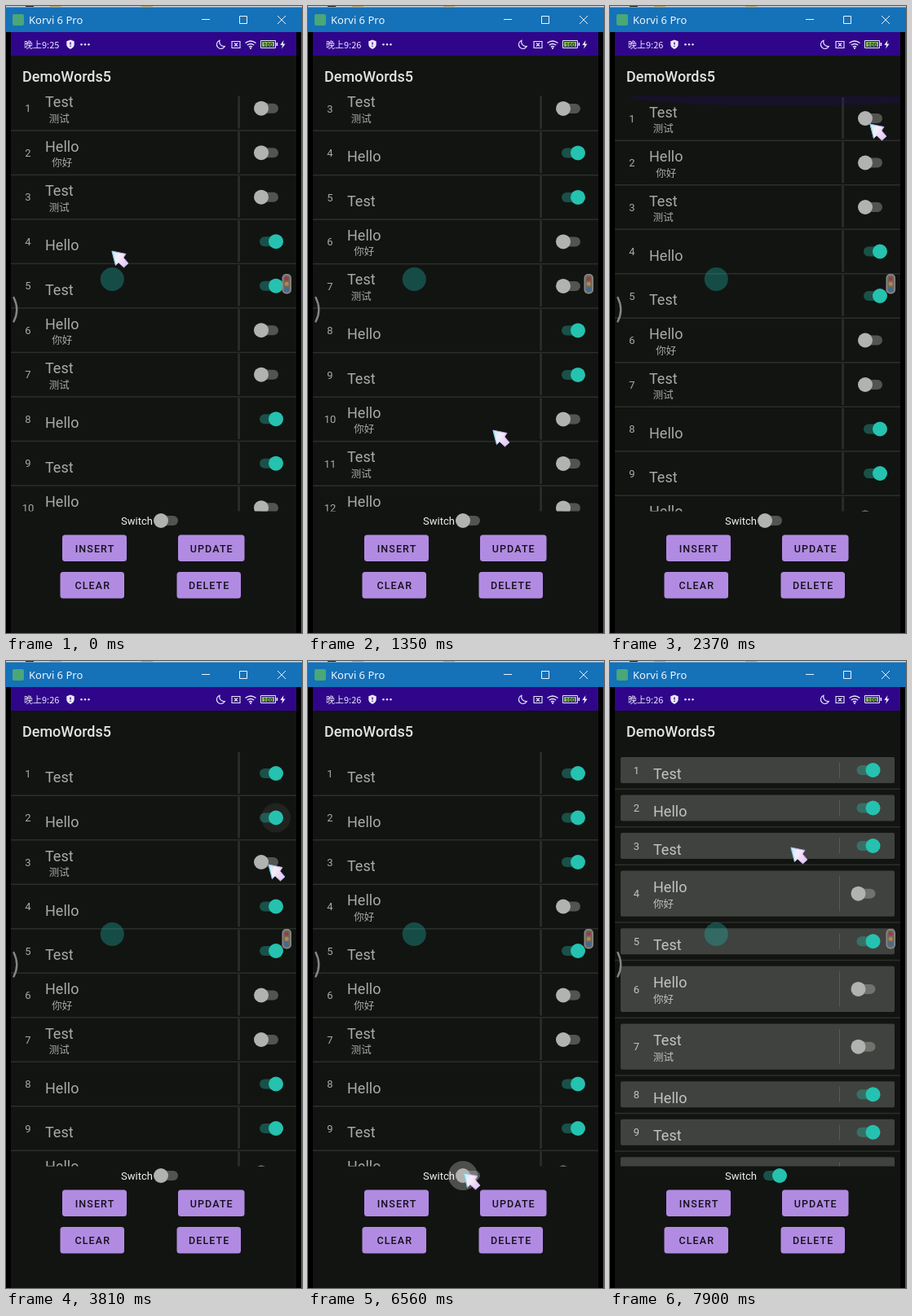
An HTML page with a canvas that plays this animation: 363 by 770 pixels, repeating every 7.99 s.

```html
<!DOCTYPE html>
<html lang="en">
<head>
<meta charset="utf-8">
<title>List demo</title>
<style>
html, body { margin: 0; width: 100%; height: 100%; overflow: hidden; background: #000; }
canvas { display: block; }
</style>
</head>
<body>
<canvas id="stage" width="363" height="770"></canvas>
<script>
const ctx = document.getElementById('stage').getContext('2d');
const LOOP = 7990;
const CARDS_AT = 6650;
const TOP = 111.5, BOTTOM = 620.5, ROW = 54.5;
const BG = '#121411', TEAL = '#25c2b0', GREY = '#b1b3b0';
const ROBOTO = 'Roboto, sans-serif';
const CJK = '"Noto Sans CJK SC", "Noto Sans CJK", sans-serif';

// [time, value, ...]
const SCROLL = [[0, 11.5], [120, 110], [280, 250], [430, 307], [900, 307],
  [1100, 245], [1350, 121.5], [1560, 30], [1680, 0]];
const POINTER = [[0, 130, 301], [510, 191, 400], [850, 205, 408], [1350, 227, 521],
  [1680, 237, 560], [1800, 242, 556], [2280, 319, 145], [2750, 319, 145],
  [3150, 321, 197], [3520, 322, 197], [3790, 322, 250], [4250, 322, 250],
  [4600, 322, 302], [5150, 322, 304], [6100, 197, 625], [6300, 191, 629],
  [7230, 191, 629], [7860, 222, 229]];
const CLICKS = { 1: 2750, 2: 3480, 3: 4120, 4: 5000 };
const SWITCH_CLICK = 6400;
const INITIALLY_ON = [4, 5, 8, 9, 14];

const clamp = v => Math.max(0, Math.min(1, v));
const smooth = v => { v = clamp(v); return v * v * (3 - 2 * v); };

function sample(keys, t, ease = v => v) {
  const next = keys.findIndex(k => k[0] > t);
  if (next < 0) return keys[keys.length - 1].slice(1);
  const a = keys[next - 1], b = keys[next];
  const f = ease((t - a[0]) / (b[0] - a[0]));
  return a.slice(1).map((v, i) => v + (b[i + 1] - v) * f);
}

function rect(x, y, w, h, color) {
  ctx.fillStyle = color;
  ctx.fillRect(x, y, w, h);
}

function round(x, y, w, h, r, color) {
  ctx.fillStyle = color;
  ctx.beginPath();
  ctx.roundRect(x, y, w, h, r);
  ctx.fill();
}

function disc(x, y, r, color) {
  ctx.fillStyle = color;
  ctx.beginPath();
  ctx.arc(x, y, r, 0, 7);
  ctx.fill();
}

function stroke(path, color, width) {
  ctx.strokeStyle = color;
  ctx.lineWidth = width;
  ctx.stroke(new Path2D(path));
}

function fill(path, color) {
  ctx.fillStyle = color;
  ctx.fill(new Path2D(path));
}

function text(str, x, y, font, color, align = 'left') {
  ctx.font = font;
  ctx.fillStyle = color;
  ctx.textAlign = align;
  ctx.fillText(str, x, y);
}

function toggle(x, y, pos) {
  ctx.globalAlpha = 0.35;
  round(x - 11, y - 6, 23, 12, 6, pos > 0.5 ? TEAL : '#c8cac7');
  ctx.globalAlpha = 1;
  disc(x - 9 + 18 * pos, y, 9, pos > 0.5 ? TEAL : GREY);
}

function ripple(x, y, age, strength) {
  if (age < 0 || age > 480) return;
  const alpha = strength * (1 - clamp((age - 200) / 280));
  disc(x, y, 18 * smooth(age / 150 + 0.2), `rgba(255,255,255,${alpha})`);
}

function rowState(n, t) {
  const start = INITIALLY_ON.includes(n);
  const age = n in CLICKS ? t - CLICKS[n] : -1;
  const on = age >= 0 ? !start : start;
  const moved = age >= 0 ? smooth(age / 180) : 1;
  return {
    on, age,
    pos: on ? moved : 1 - moved,
    title: n % 2 ? 'Test' : 'Hello',
    sub: n % 2 ? '测试' : '你好'
  };
}

function plainRow(n, y, row) {
  const color = '#a9aba8';
  rect(6, y + 26.5, 350, 1.5, '#2c2e2b');
  rect(284.3, y - 26, 2.6, 51, '#2c2e2b');
  text(n, 27, y + 4.7, '13px ' + ROBOTO, color, 'center');
  text(row.title, 48, y + (row.on ? 11 : -1.5), '18px ' + ROBOTO, color);
  if (!row.on) {
    const middle = 48 + ctx.measureText(row.title).width / 2;
    text(row.sub, middle, y + 17, '12.5px ' + CJK, color, 'center');
  }
  ripple(row.on ? 331 : 313, y, row.age, 0.12);
  toggle(322, y, row.pos);
}

function cardRow(n, top, height, row) {
  const y = top + 6.5, h = height - 14.5, mid = y + h / 2;
  const color = '#c2c4c1';
  rect(6, top + height - 1.5, 350, 1.5, '#2c2e2b');
  round(13, y, 336, h, 2, '#40423f');
  rect(281, y + 6.5, 1, h - 13, '#585a57');
  text(n, 32.5, mid + 4.7, '13px ' + ROBOTO, color, 'center');
  text(row.title, 53, mid + (row.on ? 10.5 : -2), '18px ' + ROBOTO, color);
  if (!row.on) text(row.sub, 53, mid + 17, '12.5px ' + CJK, color);
  toggle(313.5, mid, row.pos);
}

function list(t) {
  ctx.save();
  ctx.beginPath();
  ctx.rect(6, 110.5, 350, BOTTOM - 110.5);
  ctx.clip();
  const [scroll] = sample(SCROLL, t);
  let top = TOP - scroll;
  for (let n = 1; n <= 15; n++) {
    const row = rowState(n, t);
    if (t < CARDS_AT) {
      plainRow(n, top + 26.5, row);
      top += ROW;
    } else {
      const height = row.on ? 46.5 : 70.75;
      cardRow(n, top, height, row);
      top += height;
    }
  }
  const glow = smooth((t - 1680) / 150) * (1 - smooth((t - 2300) / 250));
  if (glow > 0) {
    ctx.fillStyle = `rgba(45,8,140,${0.25 * glow})`;
    ctx.beginPath();
    ctx.ellipse(215, TOP, 190, 11, 0, 0, 7);
    ctx.fill();
  }
  ctx.restore();
}

function windowBar() {
  rect(0, 0, 363, 2, '#cfd6dc');
  rect(24, 0, 10, 1, '#222');
  [54, 166].forEach(x => rect(x, 0, 14, 1, '#c9a76a'));
  rect(0, 1.5, 363, 30.5, '#1571b8');
  round(8, 10, 14, 14, 2, '#49a778');
  text('Korvi 6 Pro', 28, 22, '13px "Noto Sans", sans-serif', '#f2f7fb');
  stroke('M240 16.5h10M286.5 12.5h9v9h-9zM333 12l10 10M343 12l-10 10', '#eef4f9', 1);
}

function statusBar(t) {
  rect(6, 32, 350, 29, '#2f068a');
  const white = '#ece8f6';
  text(t < 930 ? '晚上9:25' : '晚上9:26', 22, 51.5, '500 11px ' + CJK, white);
  fill('M79 41.5l4.7 1.7v4q0 3.7-4.7 5.7q-4.7-2-4.7-5.7v-4z', white);
  stroke('M79 44.5v3M79 48.7v1.3', '#2f068a', 1.3);
  [92.5, 97, 101.5].forEach(x => disc(x, 47.3, 1.2, white));
  stroke('M262 42.3a5.2 5.2 0 1 0 6.3 7.2a5.5 5.5 0 0 1-6.3-7.2z', white, 1.1);
  stroke('M277 43.5h10v8h-10zM280 45.5l4 4M284 45.5l-4 4', white, 1.1);
  stroke('M293.5 45.5q6.5-5 13 0M295.8 48q4.2-3.2 8.4 0M298 50.3q2-1.4 4 0', white, 1.5);
  disc(300, 52, 1.1, white);
  ctx.lineCap = 'butt';
  stroke('M312.5 42.5h18v9h-18z', white, 1);
  rect(314, 44, 15, 6, '#83bf55');
  rect(331.5, 45, 1.7, 4, white);
  text('100', 321.5, 50, 'bold 7px ' + ROBOTO, '#24352a', 'center');
  fill('M340.5 42l-4.2 6h2.7l-.8 4.5l4.3-6h-2.7z', white);
}

function button(label, x, y, w) {
  round(x, y, w, 32.5, 3.5, '#b18be2');
  ctx.letterSpacing = '1.1px';
  text(label, x + w / 2 + 0.5, y + 21, '500 12.5px ' + ROBOTO, '#15111c', 'center');
  ctx.letterSpacing = '0px';
}

function controls(t) {
  text('Switch', 141, 637, '13px ' + ROBOTO, '#f1f1f1');
  const on = t >= CARDS_AT;
  if (!on) ripple(190, 632, t - SWITCH_CLICK, 0.25);
  toggle(199, 632, on ? 1 : 0);
  button('INSERT', 69, 649.5, 79);
  button('UPDATE', 211, 649.5, 81.5);
  button('CLEAR', 66.5, 695, 78.5);
  button('DELETE', 209.5, 695, 78.5);
}

function overlays() {
  disc(130.3, 335.5, 14.5, 'rgba(30,178,166,.36)');
  ctx.lineCap = 'round';
  stroke('M9.5 358q7.5 15 0 29.5', '#858784', 2.4);
  ctx.lineCap = 'butt';
  round(338.5, 329, 11.5, 24.5, 5, '#8b8a86');
  round(340, 330.5, 8.5, 21.5, 4, '#6b6966');
  ['#a23b3b', '#b9853a', '#2f6fa8'].forEach((c, i) => disc(344.2, 335 + i * 6.3, 2.5, c));
}

function pointer(t) {
  const [x, y] = sample(POINTER, t, smooth);
  ctx.save();
  ctx.translate(x, y);
  const tint = ctx.createLinearGradient(0, 4, 20, 16);
  tint.addColorStop(0, '#bff0f2');
  tint.addColorStop(0.35, '#f5eefb');
  tint.addColorStop(0.7, '#f0d5f3');
  tint.addColorStop(1, '#d9cdf6');
  const shape = 'M0 0L17 3.5L14 8L20 15L14.5 20L8 14L4.5 17.5Z';
  ctx.lineJoin = 'round';
  fill(shape, tint);
  stroke(shape, '#b9a9e6', 1);
  stroke('M0 0L4.5 17.5', '#7fd6e2', 1);
  ctx.restore();
}

function draw(t) {
  rect(0, 0, 363, 770, '#000');
  rect(6, 61, 350, 709, BG);
  rect(362, 32, 1, 738, '#1571b8');
  windowBar();
  statusBar(t);
  text('DemoWords5', 20, 93, '500 18px ' + ROBOTO, '#e2e4e1');
  list(t);
  controls(t);
  overlays();
  pointer(t);
}

function tick() {
  draw(performance.now() % LOOP);
  requestAnimationFrame(tick);
}
tick();
</script>
</body>
</html>
```
